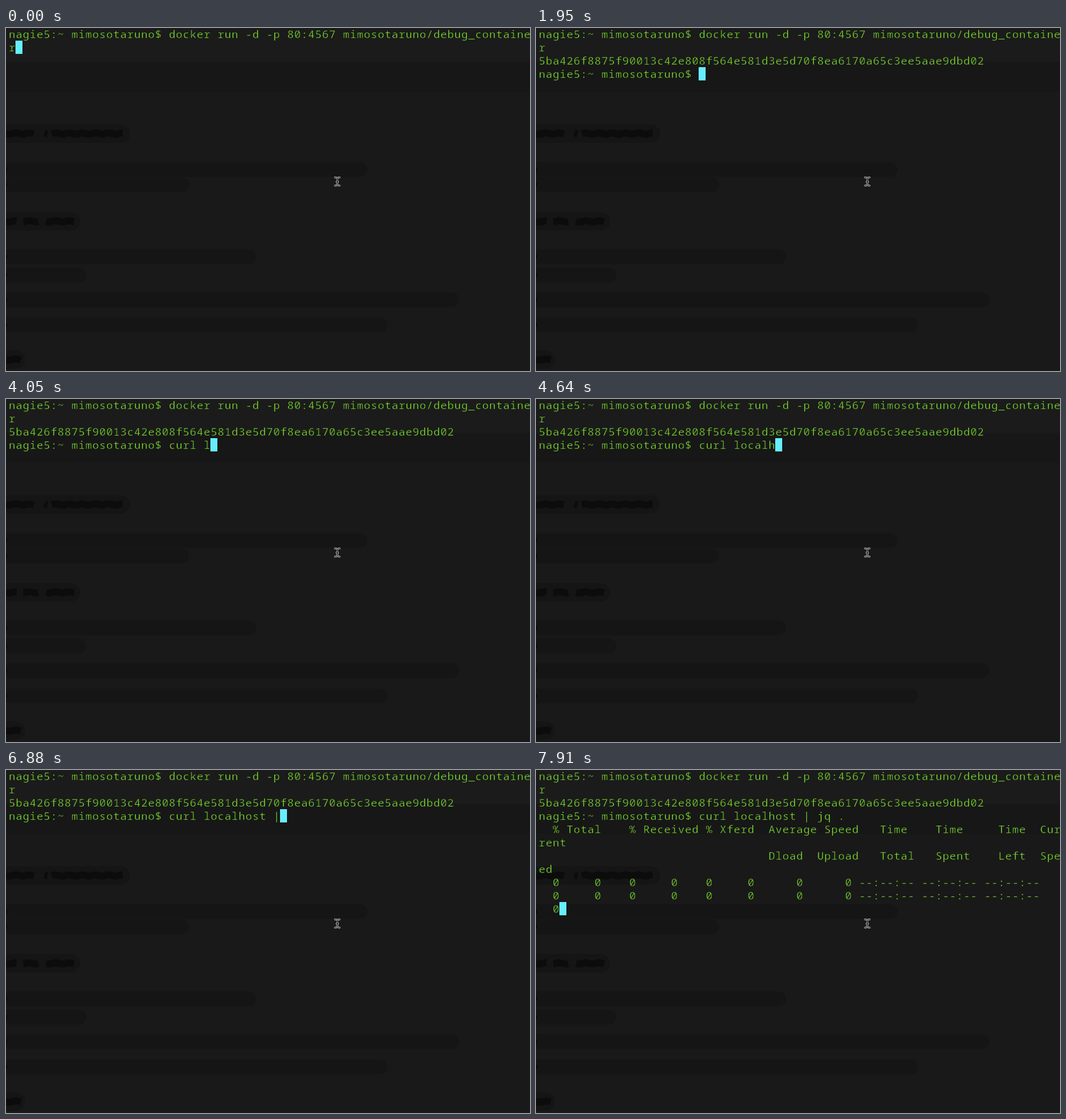
An HTML page that plays this animation: 828 by 543 pixels, repeating every 8 s.

```html
<!DOCTYPE html>
<html lang="en">
<head>
<meta charset="utf-8">
<title>Terminal session</title>
<style>
  html, body { margin: 0; width: 100%; height: 100%; overflow: hidden; background: #191919; }
  #stage { position: relative; width: 828px; height: 543px; overflow: hidden; }
  svg { position: absolute; left: 0; top: 0; fill: none; }
  pre {
    position: absolute; margin: 0;
    font: 300 17px/21px "Noto Sans Mono", "DejaVu Sans Mono", monospace;
    letter-spacing: .8px; font-variant-ligatures: none;
  }
  /* A background-coloured outline thins the strokes */
  #screen { left: 4.4px; top: -1px; color: #80e830; -webkit-text-stroke: .4px #191919; }
  #cursor { width: 11px; height: 21px; background: #66eeff; color: #191919; overflow: hidden; }
</style>
</head>
<body>
<div id="stage">
  <svg id="backdrop" width="828" height="543"></svg>
  <pre id="screen"></pre>
  <pre id="cursor"></pre>
  <svg width="828" height="543" stroke-linecap="square">
    <defs>
      <path id="beam" d="M520 236.5 H521.5 L523.5 238.5 L525.5 236.5 H527 M523.5 238.5 V247.5 M520 249.5 H521.5 L523.5 247.5 L525.5 249.5 H527 M522.5 243.5 H524.5"/>
    </defs>
    <use href="#beam" stroke="#b8b8b8" stroke-width="2.6"/>
    <use href="#beam" stroke="#151515" stroke-width="1"/>
  </svg>
</div>
<script>
const LOOP = 8000, TICK = 149.2;
const COLS = 75, CELL = 11, ROW = 21, LEFT = 4, TOP = -1;
const screen = document.getElementById('screen');
const cursor = document.getElementById('cursor');

// Smudged page showing faintly through the window
const haze = (y, end, height) =>
  `<path d="M-20 ${y}H${end - height / 2}" stroke="#151515" stroke-width="${height}" stroke-linecap="round"/>`;

const line = (y, end) => haze(y, end, 23) + `<path d="M0 ${y}h2" stroke="#0c0c0c" stroke-width="6"/>`;

// The dashes are the heading's words and gaps
function heading(y, end, words) {
  let wave = `M0 ${y}`;
  for (let x = 2; x < end; x += 2) wave += `L${x} ${(y + Math.sin(x * .3)).toFixed(1)}`;
  return haze(y, end, 29) +
    `<path d="${wave}" stroke="#0c0c0c" stroke-width="11" stroke-dasharray="${words} 999"/>`;
}

document.getElementById('backdrop').innerHTML =
  '<path d="M0 26.5H828" stroke="#1b1b1b" stroke-width="53"/>' +
  '<rect x="-9" y="55" width="846" height="46" rx="8" fill="#171717"/>' +
  heading(167, 196, '45 17 5 7 114') +
  line(224, 571) + line(248, 289) +
  heading(306, 117, '17 11 24 13 45') +
  line(362, 395) + line(391, 127) + line(430, 716) + line(470, 603) +
  heading(525, 30, '24');

// Terminal contents
const PROMPT = 'nagie5:~ mimosotaruno$ ';
const RUN = PROMPT + 'docker run -d -p 80:4567 mimosotaruno/debug_container';
const ID = '5ba426f8875f90013c42e808f564e581d3e5d70f8ea6170a65c3ee5aae9dbd02';
const HEAD = [
  '  % Total    % Received % Xferd  Average Speed   Time    Time     Time  Current',
  ' '.repeat(33) + 'Dload  Upload   Total   Spent    Left  Speed'
];
const PROGRESS = '  0     0    0     0    0     0      0      0 --:--:-- --:--:-- --:--:--     0';

// Keys pressed in each tick: \b deletes, ~ blinks the cursor off
const KEYS = 'cu,r,l, l,,oca,l,h,os,t,,,,~,, ,,,\\,,\b,,|, ,jq, ,.'.split(',');
const TYPING = 24, REPLY = 52;

const wrap = lines => lines.flatMap(s => s.match(new RegExp(`.{1,${COLS}}`, 'g')) || ['']);

// Wrapped rows plus a cursor cell, by default at the end of the text
function view(lines, at) {
  const rows = wrap(lines);
  return { rows, at: at || [rows.length - 1, rows.at(-1).length] };
}

function typed(tick) {
  let text = '', blink = false;
  for (const key of KEYS.slice(0, Math.max(0, tick - TYPING + 1))) {
    if (key === '~') blink = true;
    else if (key === '\b') text = text.slice(0, -1);
    else text += key;
    if (key && key !== '~') blink = false;
  }
  return { text, blink };
}

function viewAt(tick) {
  if (tick < 1) return view([RUN]);
  if (tick < 8) return view([RUN], [0, PROMPT.length]);
  if (tick < 10) return view([RUN, '']);
  if (tick < 13) return view([RUN, ID, '']);
  const { text, blink } = typed(tick);
  const lines = [RUN, ID, PROMPT + text];
  if (tick < REPLY) return { ...view(lines), blink };
  // A carriage return only reaches the start of the wrapped row, so each update adds a row
  const updates = Array(tick - REPLY + 1).fill(PROGRESS.slice(0, COLS));
  return view([...lines, ...HEAD, ...updates, PROGRESS.slice(COLS)]);
}

let shown;
function draw(time) {
  const tick = Math.floor(time % LOOP / TICK);
  if (tick === shown) return;
  shown = tick;
  const { rows, at: [row, col], blink } = viewAt(tick);
  screen.textContent = rows.join('\n');
  cursor.hidden = !!blink;
  cursor.style.left = LEFT + col * CELL + 'px';
  cursor.style.top = TOP + row * ROW + 'px';
  cursor.textContent = rows[row][col] || '';
}

const origin = performance.now();
function play() {
  draw(performance.now() - origin);
  requestAnimationFrame(play);
}
play();
</script>
</body>
</html>
```
